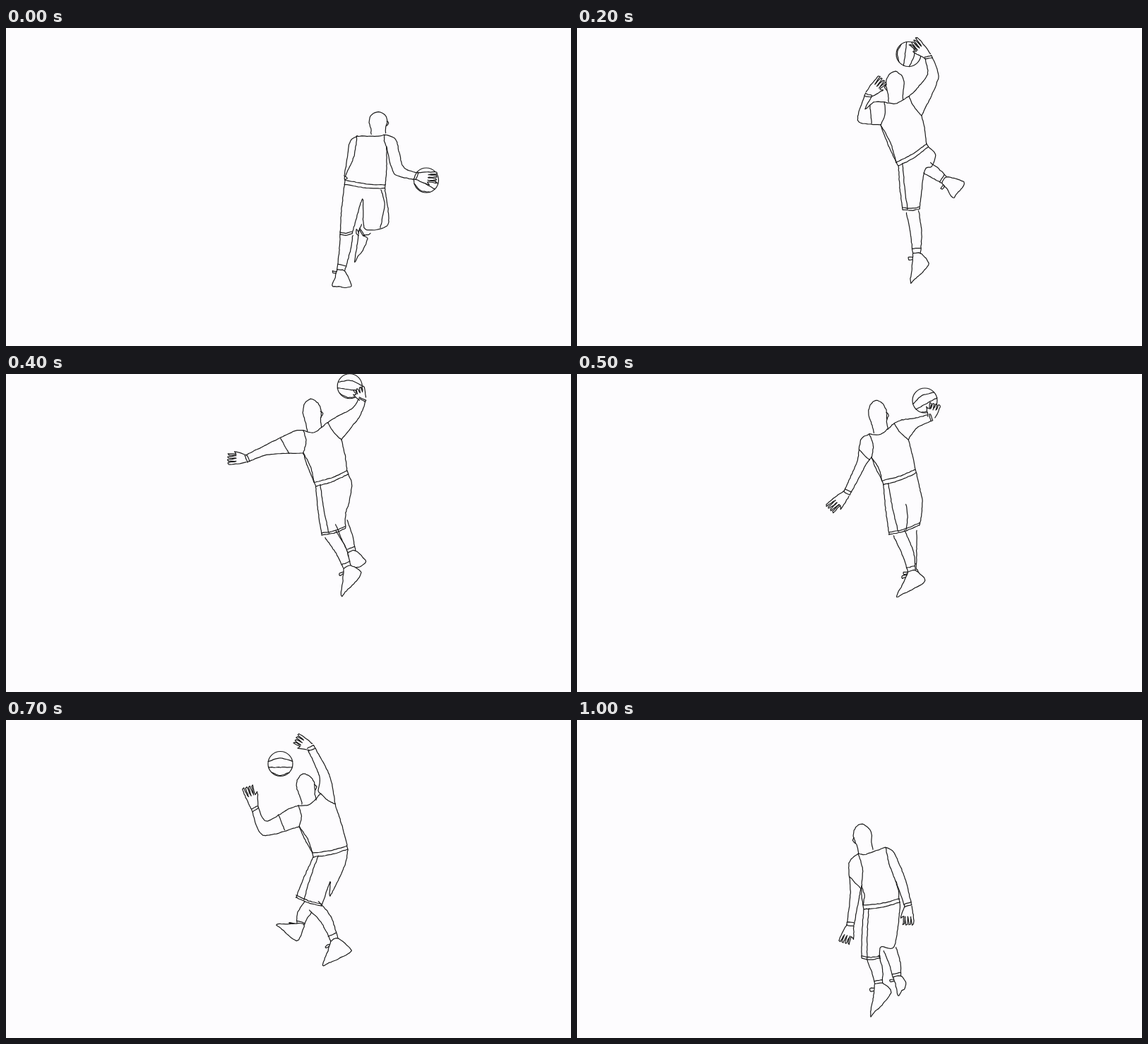
An HTML page with a canvas that plays this animation: 800 px wide and 450 px high, repeating every 1100 ms.

```html
<!DOCTYPE html>
<html lang="en">
<head>
<meta charset="utf-8">
<title>Line-drawn layup</title>
<style>
html, body { margin: 0; width: 100%; height: 100%; overflow: hidden; background: #fdfcfe; }
canvas { display: block; }
</style>
</head>
<body>
<canvas id="stage" width="800" height="450"></canvas>
<script>
const PAPER = '#fdfcfe', INK = '#1c1c1c', STEP = 100, BALL = 17.5;
const ctx = document.getElementById('stage').getContext('2d');

// head: neck, crown, ear side.  jersey: straps, armholes, hem ends (left, right).
// arms: shoulder, elbow, wrist, fingertips.  shorts: hem ends, then the right side.
// legs: start, calf, ankle, toe, heel.  ball: centre, turn.
const dribble = {
  ball: [595, 215.5, 0.5],
  head: [527, 150, 527, 119, 1],
  jersey: [497, 153, 536, 151, 480, 210, 539, 168, 480, 215, 537, 222],
  armL: [487, 161, 490, 184, 484, 210, 484, 210],
  armR: [552, 158, 556, 201, 582, 210, 610, 213],
  shorts: [473, 292, 490, 291, 541, 278, 508, 284, 505, 242],
  legA: [482, 293, 480, 313, 474, 343, 463, 366, 489, 365],
  legB: [510, 284, 508, 286, 503, 289, 494, 331, 512, 298],
  crease: [531, 229, 536, 250, 530, 283]
};
const gather = {
  ball: [469.5, 37, 1.7],
  head: [451, 104, 450, 62, -1],
  jersey: [435, 105, 470, 97, 430, 137, 488, 124, 452, 190, 495, 164],
  armL: [420, 105, 403, 123, 413, 94, 434, 73],
  armR: [480, 87, 504, 68, 497, 40, 475, 19],
  shorts: [461, 257, 485, 256, 508, 180, 502, 196, 492, 202],
  legA: [475, 260, 480, 290, 481, 319, 473, 361, 498, 333],
  legB: [496, 198, 508, 206, 520, 215, 534, 240, 548, 218]
};
const rise = {
  ball: [481, -3, 0.8],
  head: [443, 77, 439, 34, 1],
  jersey: [428, 74, 462, 67, 425, 106, 481, 93, 441, 156, 487, 139],
  armL: [412, 73, 372, 97, 353, 74, 347, 46],
  armR: [477, 56, 511, 39, 508, 9, 490, -2],
  shorts: [452, 229, 476, 223, 494, 152, 483, 184, 474, 196],
  legA: [463, 229, 480, 246, 492, 267, 498, 313, 513, 270],
  legB: [478, 198, 493, 214, 504, 227, 515, 250, 531, 238]
};
const cock = {
  ball: [492.5, 37.5, -0.5],
  head: [430, 82, 423, 38, 1],
  jersey: [414, 85, 449, 70, 417, 118, 469, 93, 432, 151, 479, 135],
  armL: [402, 93, 403, 126, 382, 169, 358, 192],
  armR: [460, 65, 481, 69, 502, 61, 506, 42],
  shorts: [442, 227, 485, 214, 485, 160, 489, 180, 488, 198],
  legA: [456, 225, 469, 255, 474, 279, 453, 316, 493, 292],
  legB: [472, 222, 473, 248, 475, 276, 460, 308, 488, 292],
  crease: [466, 184, 468, 205, 466, 220]
};
const release = {
  ball: [388.5, 62, 0],
  head: [429, 117, 421, 77, 1],
  jersey: [414, 121, 446, 104, 415, 151, 466, 119, 434, 188, 483, 178],
  armL: [400, 126, 366, 153, 352, 124, 343, 94],
  armR: [442, 100, 451, 79, 431, 38, 410, 27],
  shorts: [411, 251, 447, 263, 480, 205, 459, 249, 459, 229],
  legA: [436, 263, 453, 282, 465, 311, 449, 348, 489, 326],
  legB: [430, 262, 420, 276, 417, 289, 383, 290, 413, 312]
};
const follow = {
  ball: [362.5, 108.5, 1.2],
  head: [430, 158, 419, 117, -1],
  jersey: [415, 154, 443, 147, 415, 189, 466, 167, 430, 234, 477, 223],
  armL: [400, 150, 361, 145, 367, 114, 376, 92],
  armR: [443, 130, 446, 101, 421, 76, 398, 52],
  shorts: [419, 292, 459, 305, 478, 238, 472, 251, 464, 268],
  legA: [450, 307, 465, 328, 474, 356, 461, 401, 497, 371],
  legB: [423, 269, 415, 284, 408, 299, 376, 292, 399, 324]
};
const land = {
  head: [409, 187, 401, 148, -1],
  jersey: [398, 189, 437, 180, 403, 235, 452, 230, 405, 262, 456, 253],
  armL: [385, 203, 394, 245, 387, 291, 379, 316],
  armR: [449, 188, 458, 226, 469, 263, 468, 290],
  shorts: [403, 337, 429, 337, 457, 270, 449, 321, 430, 321],
  legA: [419, 336, 425, 355, 427, 373, 416, 420, 445, 384],
  legB: [443, 324, 450, 345, 453, 363, 456, 390, 466, 372]
};

const poses = [
  dribble, between(dribble, gather), gather, rise,
  { ...between(rise, cock), armL: [408, 81, 368, 108, 340, 120, 314, 119] },
  cock,
  { ...between(cock, release), ball: [446, 18, -0.2], armR: [444, 88, 470, 62, 465, 36, 448, 10] },
  release, follow, between(follow, land, 17), land
];

function between(from, to, drop = 0) {
  const pose = {};
  for (const part in from) {
    if (!to[part]) continue;
    pose[part] = from[part].map((v, i) => (v + to[part][i]) / 2 + (i % 2 ? drop : 0));
  }
  return pose;
}

const pairs = nums => nums.flatMap((v, i) => i % 2 ? [[nums[i - 1], v]] : []);
const add = (p, q, k = 1) => [p[0] + q[0] * k, p[1] + q[1] * k];
const mix = (p, q, t) => [p[0] + (q[0] - p[0]) * t, p[1] + (q[1] - p[1]) * t];
const gap = (p, q) => Math.hypot(q[0] - p[0], q[1] - p[1]);
const turn = ([x, y]) => [-y, x];
const dir = (p, q) => {
  const d = gap(p, q) || 1;
  return [(q[0] - p[0]) / d, (q[1] - p[1]) / d];
};

// Maps [share of the way, pixels aside] pairs to the stage.
const along = (p, q, shape) => {
  const side = turn(dir(p, q));
  return shape.map(([u, v]) => add(mix(p, q, u), side, v));
};

// One contour of a limb with the given half widths.
function edge(joints, widths, sign) {
  return joints.map((p, i) => {
    const a = joints[i - 1], b = joints[i + 1];
    const n1 = turn(dir(a || p, a ? p : b)), n2 = turn(dir(b ? p : a, b || p));
    const m = add(n1, n2), len = Math.hypot(...m) + 0.01;
    return add(p, m, sign * widths[i] * Math.min(2 / len, 1.5) / len);
  });
}

// Cardinal spline, cut into pieces of about three pixels.
function curve(pts) {
  const out = [pts[0]];
  for (let i = 0; i < pts.length - 1; i++) {
    const b = pts[i], c = pts[i + 1], a = pts[i - 1] || b, d = pts[i + 2] || c;
    const n = Math.ceil(gap(b, c) / 3);
    for (let j = 1; j <= n; j++) {
      const t = j / n;
      let p = mix(b, c, t * t * (3 - 2 * t));
      p = add(p, add(c, a, -1), 0.4 * t * (1 - t) ** 2);
      out.push(add(p, add(d, b, -1), 0.4 * t * t * (t - 1)));
    }
  }
  return out;
}

// Slight pencil tremor, fixed for each place on the sheet.
function tremor(x, y) {
  const n = Math.sin(x * 12.99 + y * 78.23) * 43758.5;
  return (n - Math.floor(n) - 0.5) * 0.8;
}

function trace(pts) {
  ctx.beginPath();
  for (const [x, y] of curve(pts)) ctx.lineTo(x + tremor(x, y), y + tremor(y, x));
}
function line(...pts) { trace(pts); ctx.stroke(); }
function cover(pts) { trace(pts); ctx.fill(); }
function shape(pts) { cover(pts); ctx.stroke(); }

function drawBall([x, y, spin]) {
  ctx.beginPath();
  ctx.arc(x, y, BALL, 0, 7);
  ctx.stroke();
  const place = (u, v) => [
    x + BALL * (u * Math.cos(spin) - v * Math.sin(spin)),
    y + BALL * (u * Math.sin(spin) + v * Math.cos(spin))
  ];
  for (const v of [-0.2, 0.28, 0.7]) {
    const u = Math.sqrt(1 - v * v);
    line(place(-u, v), place(0, v + (v - 0.28) * 0.55), place(u, v));
  }
}

function drawHand(wrist, tip, thumb) {
  const outline = [[0, -5]];
  for (let k = 0; k < 4; k++) {
    const v = k * 4 - 7;
    outline.push([0.55, v - 1], [0.95, v * 1.1 - 1], [1, v * 1.1 + 1]);
  }
  outline.push([0.55, 6], [0.65, 10], [0.35, 8], [0, 5]);
  shape(along(wrist, tip, outline.map(([u, v]) => [u, v * thumb])));
}

function drawArm(nums, strap, pit, sign) {
  const [shoulder, elbow, wrist, tip] = pairs(nums);
  const joints = [shoulder, elbow, wrist], widths = [0, 6.8, 5];
  const top = [strap, ...edge(joints, widths, sign)];
  const bottom = [pit, ...edge(joints, widths, -sign).slice(1)];
  if (gap(wrist, tip) < 1) return line(...top);
  cover([...top, ...bottom.reverse()]);
  bottom.reverse();
  line(...top);
  line(...bottom);
  if (sign > 0) line(mix(top[1], top[2], 0.45), mix(pit, bottom[1], 0.4));
  const side = turn(dir(wrist, tip))[0];
  drawHand(wrist, tip, side * sign < 0 ? -1 : 1);
  for (const t of [0, 0.1]) line(mix(top[3], top[2], t), mix(bottom[2], bottom[1], t));
}

function drawLeg(nums) {
  const [start, calf, ankle, toe, heel] = pairs(nums);
  const joints = [start, calf, ankle], widths = [9, 8, 5.5];
  let front = edge(joints, widths, 1), back = edge(joints, widths, -1);
  if (gap(front[2], heel) < gap(back[2], heel)) [front, back] = [back, front];
  cover([...front, ...[...back].reverse()]);
  line(...front);
  line(...back);
  line(mix(front[2], front[1], 0.25), mix(back[2], back[1], 0.25));

  const f = front[2], b = back[2];
  const inward = dir(toe, heel);
  shape([
    f, mix(f, toe, 0.45), add(mix(f, toe, 0.85), inward, -2), toe,
    add(toe, inward, 8), add(mix(toe, heel, 0.55), dir(heel, ankle), -2),
    heel, b, f
  ]);
  const out = dir(b, f), lace = mix(f, toe, 0.12);
  line(lace, add(lace, out, 6), add(mix(f, toe, 0.22), out, 5), mix(f, toe, 0.2));
}

function drawHead([nx, ny, cx, cy, ear]) {
  const neck = [nx, ny], crown = [cx, cy];
  shape(along(neck, crown, [
    [0, -10], [0.25, -10.5], [0.6, -13], [0.85, -10], [1, -3],
    [1, 3], [0.85, 10], [0.6, 13], [0.25, 10.5], [0.05, 11]
  ]));
  const s = Math.sign(ear) || 1;
  line(...along(neck, crown, [[0.58, 12 * s], [0.5, 15 * s], [0.38, 12 * s]]));
}

function drawClothes(pose, [strapL, strapR, pitL, pitR, hemL, hemR]) {
  const [nx, ny] = pose.head;
  const down = turn(dir(hemL, hemR));
  const bow = (p, q, v) => along(p, q, [[0, 0], [0.5, v], [1, 0]]);
  line(strapL, [nx, ny + 3], strapR);
  line(...bow(strapL, pitL, -4));
  line(...bow(strapR, pitR, 2));
  line(...bow(pitL, hemL, 1));
  line(...bow(pitL, hemL, -3));
  line(...bow(pitR, hemR, -1));
  line(...bow(hemL, hemR, 2));

  const waistL = add(hemL, down, 6), waistR = add(hemR, down, 5);
  line(hemL, waistL);
  line(hemR, waistR);
  line(...bow(waistL, waistR, 2));

  const [left, right, ...side] = pairs(pose.shorts);
  line(...bow(waistL, left, 1));
  line(waistR, ...side, right);
  for (const lift of [0, -3]) line(...bow(add(left, [0, lift]), add(right, [0, lift]), 2));
  if (gap(...pairs(pose.armL).slice(2)) > 1) {
    line(...bow(mix(waistL, waistR, 0.14), mix(left, right, 0.3), 1));
  }
  if (pose.crease) line(...pairs(pose.crease));
}

function drawPose(pose) {
  const jersey = pairs(pose.jersey);
  if (pose.ball) drawBall(pose.ball);
  drawLeg(pose.legB);
  drawLeg(pose.legA);
  drawArm(pose.armL, jersey[0], jersey[2], 1);
  drawArm(pose.armR, jersey[1], jersey[3], -1);
  drawHead(pose.head);
  drawClothes(pose, jersey);
}

function draw() {
  ctx.fillStyle = PAPER;
  ctx.fillRect(0, 0, 800, 450);
  ctx.strokeStyle = INK;
  ctx.lineWidth = 1.2;
  ctx.lineJoin = ctx.lineCap = 'round';
  drawPose(poses[Math.floor(performance.now() / STEP) % poses.length]);
  requestAnimationFrame(draw);
}
draw();
</script>
</body>
</html>
```
